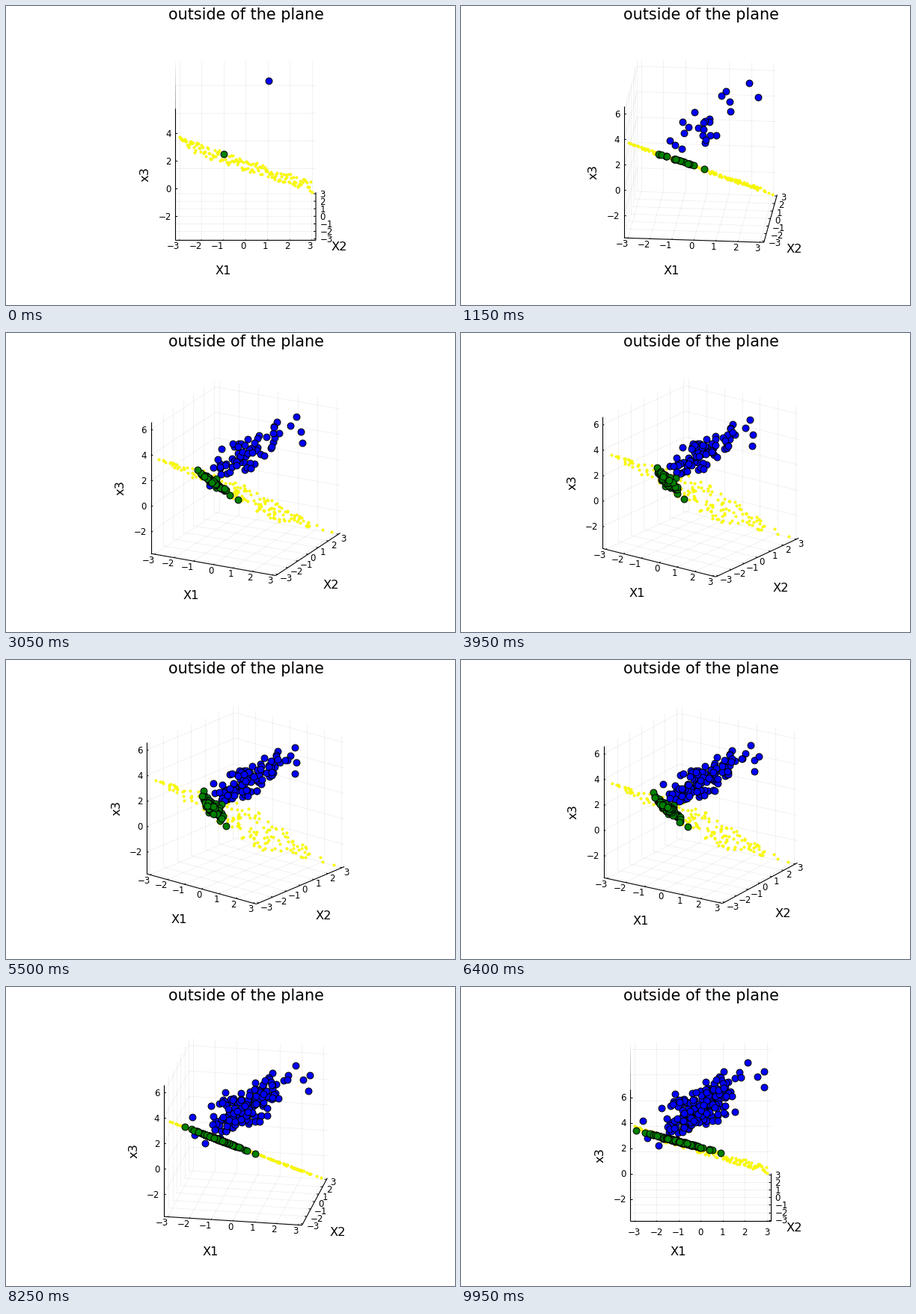
Animation of 600 by 400 pixels, one loop 10 s. Source, as a matplotlib script:

```python
import numpy as np
import matplotlib.pyplot as plt
from matplotlib.animation import FuncAnimation
from matplotlib.collections import LineCollection

W, H, DPI = 600, 400, 100
FRAMES, INTERVAL = 200, 50
PX = 72 / DPI                       # points per pixel

CX, CY, SIDE = 320.2, 193.2, 187.6  # centre and edge of the cube in pixels
TILT = np.radians(20)
LIM = 3.18
UNIT = SIDE / (2 * LIM)
DEPTH = UNIT * np.sin(TILT)
TALL = SIDE * np.cos(TILT)
Z_LOW = -3.45
SLOPE = np.array([-0.535, -0.69])   # plane: z = SLOPE . (x, y)
NORMAL = np.append(-SLOPE, 1)
SPAN = range(-3, 4)
Z_TICKS = (-2, 0, 2, 4, 6)

# points far from the crowd, by order of arrival
OUTLIERS = {0: (1.06, 1.0, 5.53), 12: (2.14, 0.88, 6.32),
            20: (2.57, 0.49, 5.47), 30: (2.88, 0.0, 4.94),
            36: (-1.9, 0.1, 0.25), 60: (-1.77, 1.05, 2.66),
            95: (-2.63, 0.95, 1.7), 125: (2.88, 0.37, 5.93),
            130: (-2.41, 0.35, 0.69)}

rng = np.random.default_rng(11)


def make_cloud():
    x = rng.triangular(-1.9, 0.3, 1.9, FRAMES)
    y = rng.uniform(-0.6, 1.2, FRAMES)
    z = 3 + 0.75 * x + 0.9 * y + rng.triangular(-0.8, 0, 0.8, FRAMES)
    cloud = np.column_stack([x, y, np.minimum(z, 6.2)])
    for i, point in OUTLIERS.items():
        cloud[i] = point
    return cloud


def make_plane(count=150):
    x = np.linspace(-3, 3, count)
    # the spread narrows to the near and far corners of the square
    y = rng.uniform(-3, 3, count)
    y[0], y[-1] = -2.75, 2.65
    return np.column_stack([x, y, np.column_stack([x, y]) @ SLOPE])


def z_limits(top):
    pad = 0.03 * (top - Z_LOW)
    return Z_LOW - pad, top + pad


def project(points, turn, zlim):
    x, y, z = np.moveaxis(np.asarray(points, float), -1, 0)
    c, s = np.cos(turn), np.sin(turn)
    height = (z - sum(zlim) / 2) / (zlim[1] - zlim[0])
    return np.stack([CX + UNIT * (x * c + y * s),
                     CY - TALL * height - DEPTH * (y * c - x * s)], -1)


cloud = make_cloud()
plane = make_plane()
feet = cloud - np.outer(cloud @ NORMAL / (NORMAL @ NORMAL), NORMAL)

fig = plt.figure(figsize=(W / DPI, H / DPI), dpi=DPI, facecolor="white")
ax = fig.add_axes([0, 0, 1, 1])
ax.set(xlim=(0, W), ylim=(H, 0))
ax.axis("off")


def lines(width, alpha, order):
    return ax.add_collection(LineCollection(
        [], colors="black", linewidths=width * PX, alpha=alpha, zorder=order),
        autolim=False)


def dots(size, face, edge, width, order):
    line, = ax.plot([], [], "o", ms=size * PX, mfc=face, mec=edge,
                    mew=width * PX, zorder=order)
    line.set_snap(False)
    return line


def label(text, size, ha="center", **kw):
    return ax.text(0, 0, text, fontsize=size * PX, ha=ha, va="baseline",
                   family="DejaVu Sans", zorder=9, **kw)


def numbers(values, ha):
    return [label(str(v).replace("-", "\u2212"), 11.8, ha) for v in values]


def place(texts, spots, dx, dy):
    for text, (x, y) in zip(texts, spots):
        text.set_position((x + dx, y + dy + 4.7))


grid = lines(0.8, 0.065, 1)
spines = lines(1.1, 1, 2)
ticks = lines(1, 1, 2)
yellow = dots(3.4, "#ffff00", "#ebeb00", 0.5, 3)
blue = dots(8.9, "blue", "black", 1, 4)
green = dots(8.9, "green", "black", 1, 5)

label("outside of the plane", 20.8).set_position((320.5, 18.5))
x_name, y_name = label("X1", 16.3), label("X2", 16.3)
z_name = label("x3", 16.3, rotation=90, rotation_mode="anchor")
x_nums = numbers(SPAN, "right")
y_nums = numbers(SPAN, "left")
z_nums = numbers(Z_TICKS, "right")


def draw(i):
    n = i + 1
    turn = np.radians(20 * (1 - np.cos(2 * np.pi * n / FRAMES)))
    zlim = lo, hi = z_limits(cloud[:n, 2].max())
    shown = [t for t in Z_TICKS if t < hi]

    def view(points):
        return project(points, turn, zlim)

    segs = []
    for t in SPAN:
        segs += [[(t, -LIM, lo), (t, LIM, lo)], [(t, LIM, lo), (t, LIM, hi)],
                 [(-LIM, t, lo), (LIM, t, lo)], [(-LIM, t, lo), (-LIM, t, hi)]]
    for t in shown:
        segs += [[(-LIM, -LIM, t), (-LIM, LIM, t)],
                 [(-LIM, LIM, t), (LIM, LIM, t)]]
    grid.set_segments(view(segs))

    axes = view([[(-LIM, -LIM, lo), (LIM, -LIM, lo)],
                 [(LIM, -LIM, lo), (LIM, LIM, lo)],
                 [(-LIM, -LIM, lo), (-LIM, -LIM, hi)]])
    spines.set_segments(axes)

    d = 0.03 * LIM
    marks = [[(t, -LIM, lo), (t, -LIM + d, lo)] for t in SPAN]
    marks += [[(LIM, t, lo), (LIM - d, t, lo)] for t in SPAN]
    marks += [[(-LIM, -LIM, t), (-LIM + d, -LIM, t)] for t in shown]
    marks = view(marks)
    ticks.set_segments(marks)

    x_ticks, y_ticks, z_ticks = np.split(marks[:, 0], [7, 14])
    level = n == FRAMES             # labels centre under a level axis
    for text in x_nums:
        text.set_ha("center" if level else "right")
    place(x_nums, x_ticks, 0 if level else 0.6, 14 if level else 7)
    out = np.array([np.cos(turn) * np.sin(TILT), np.sin(turn)])
    place(y_nums, y_ticks, *(5.6 * out / np.hypot(*out)))
    place(z_nums, z_ticks, -5.7, 0)
    for text, t in zip(z_nums, Z_TICKS):
        text.set_visible(t in shown)

    mid = axes.mean(axis=1)
    x_name.set_position(mid[0] + (-30, 45.7))
    y_name.set_position(mid[1] + (31.2, 45.5))
    z_name.set_position(mid[2] + (-36, 0))

    yellow.set_data(*view(plane).T)
    blue.set_data(*view(cloud[:n]).T)
    green.set_data(*view(feet[:n]).T)
    return []


anim = FuncAnimation(fig, draw, frames=FRAMES, interval=INTERVAL,
                     init_func=lambda: [], repeat=True, repeat_delay=0)
plt.show()
```
